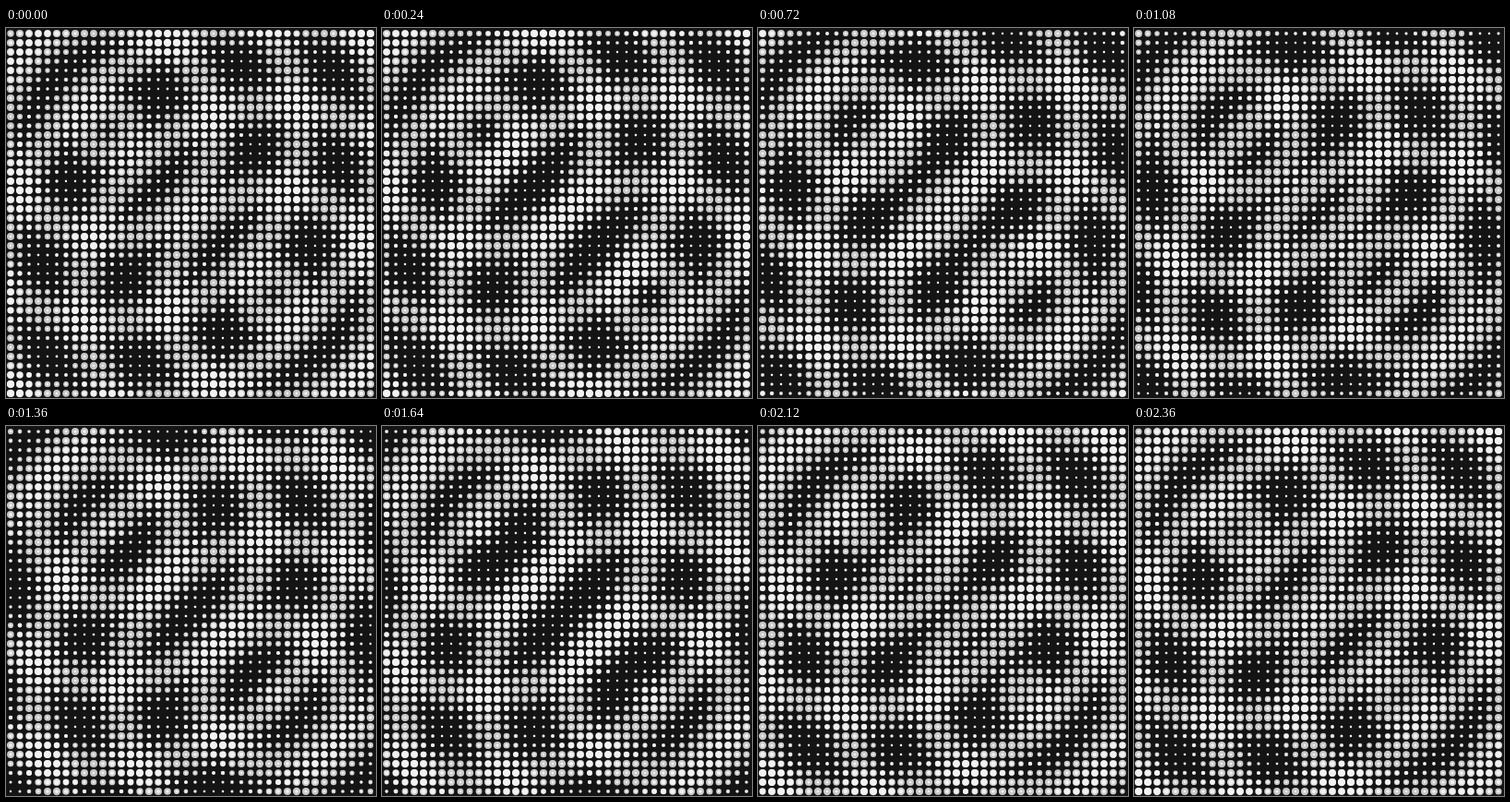
These frames come from a looping animation (401x401 px, 2400 ms). An HTML page with a canvas:

```html
<!DOCTYPE html>
<html lang="en">
<head>
<meta charset="utf-8">
<title>Dot interference</title>
<style>
  html, body { margin: 0; width: 100%; height: 100%; overflow: hidden; background: #141414; }
  canvas { display: block; }
</style>
</head>
<body>
<canvas id="stage" width="401" height="401"></canvas>
<script>
const ctx = document.getElementById('stage').getContext('2d');
const LOOP = 2400, STEP = 40, TAU = Math.PI * 2;
const COUNT = 40, PITCH = 10, WAVELENGTH = 92;
const SOURCES = [[110, 111], [290, 291]];

// Each source sends out rings and drives one translucent layer of dots.
function drawLayer([sx, sy], phase) {
  for (let row = 0; row < COUNT; row++) {
    for (let col = 0; col < COUNT; col++) {
      const x = 5 + col * PITCH, y = 6 + row * PITCH;
      const wave = Math.sin(TAU * (Math.hypot(x - sx, y - sy) / WAVELENGTH - phase));
      ctx.beginPath();
      ctx.arc(x, y, 2.65 + 1.5 * wave, 0, TAU);
      ctx.fill();
    }
  }
}

function draw() {
  const time = Math.floor(performance.now() / STEP) * STEP % LOOP;
  ctx.fillStyle = '#141414';
  ctx.fillRect(0, 0, 401, 401);
  ctx.fillStyle = 'rgba(255, 255, 255, 0.77)';
  for (const source of SOURCES) drawLayer(source, time / LOOP);
  requestAnimationFrame(draw);
}
draw();
</script>
</body>
</html>
```
